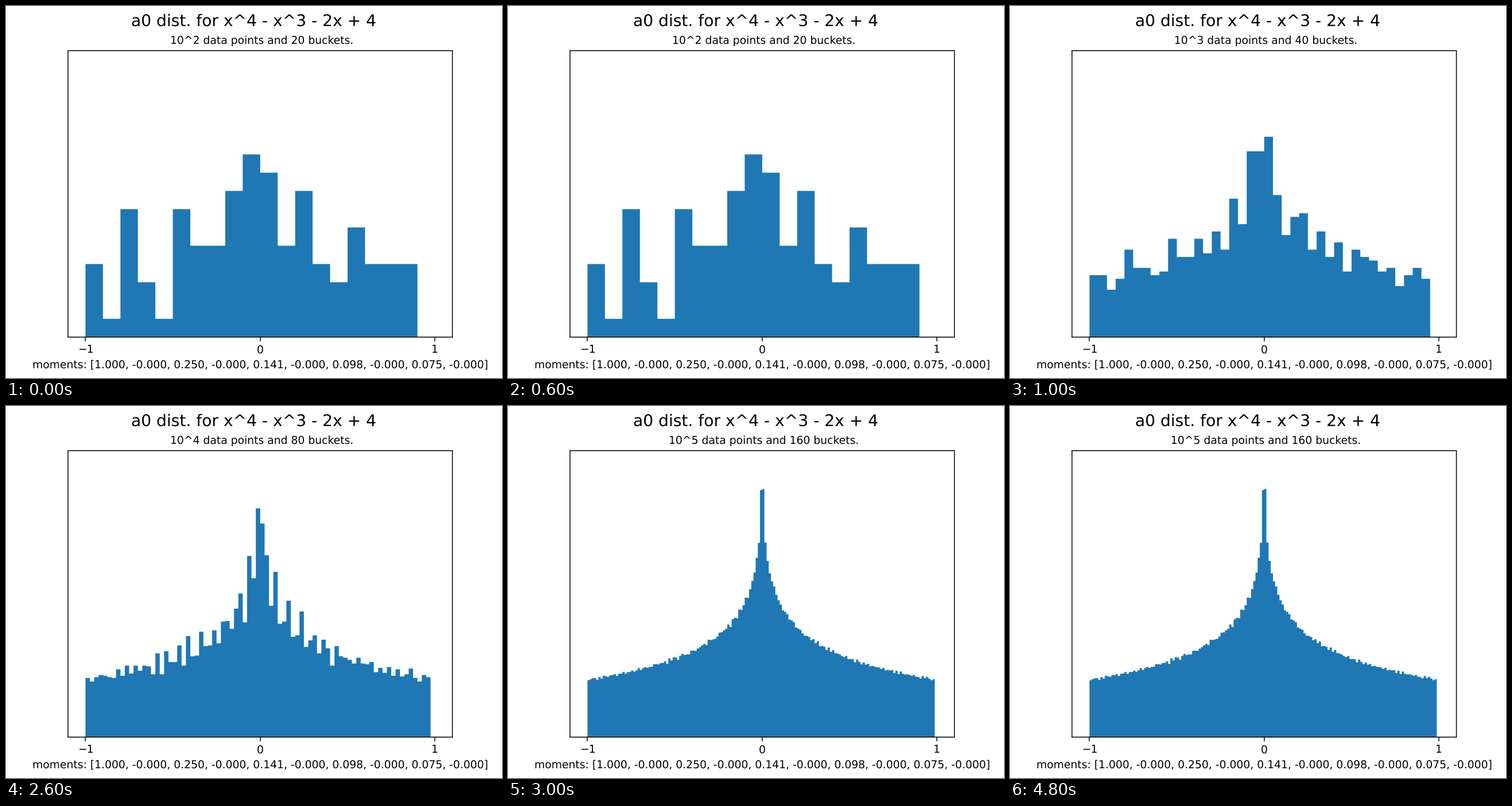
A matplotlib script that plays this animation: 864x648 px, repeating every 6 s.

```python
import numpy as np
import matplotlib.pyplot as plt
from matplotlib.animation import FuncAnimation

# Unhinted text keeps the natural letter spacing of a finely rendered plot
plt.rcParams.update({"font.family": "DejaVu Sans", "text.hinting": "none"})

POLY = "x^4 - x^3 - 2x + 4"
MOMENTS = "[1.000, -0.000, 0.250, -0.000, 0.141, -0.000, 0.098, -0.000, 0.075, -0.000]"
LAST_STEP = 3

# The roots come in conjugate pairs sqrt(2) exp(+-i theta); substituting
# u = x + 2/x turns the polynomial into u^2 - u - 4.
u = (1 + np.array([1, -1]) * np.sqrt(17)) / 2
theta = np.arccos(u / (2 * np.sqrt(2)))

# Normalised trace of the r-th power for r = 1, 2, ..., 10^5
powers = np.arange(1, 10**5 + 1)
traces = np.cos(np.outer(powers, theta)).mean(axis=1)

fig, ax = plt.subplots(figsize=(6.4, 4.8), dpi=135)
fig.suptitle(f"a0 dist. for {POLY}", fontsize=15)


def draw(frame):
    step = min(frame, LAST_STEP)
    exponent, buckets = step + 2, 20 * 2**step
    ax.clear()
    # One unsnapped outline gives soft edges without seams between the bars
    ax.hist(traces[:10**exponent], bins=np.arange(-1, 1, 2 / buckets),
            density=True, histtype="stepfilled", color="#1f77b4",
            linewidth=0, snap=False)
    ax.set_xlim(-1.1, 1.1)
    ax.set_ylim(0, 1.6)
    ax.set_xticks([-1, 0, 1])
    ax.set_yticks([])
    ax.set_title(f" 10^{exponent} data points and {buckets} buckets.", fontsize=10)
    ax.set_xlabel(f"moments: {MOMENTS}", fontsize=10)
    for spine in ax.spines.values():
        spine.set_snap(False)


# The finest histogram is held for the last three seconds
anim = FuncAnimation(fig, draw, frames=6, interval=1000, repeat=True,
                     repeat_delay=0)
plt.show()
```
